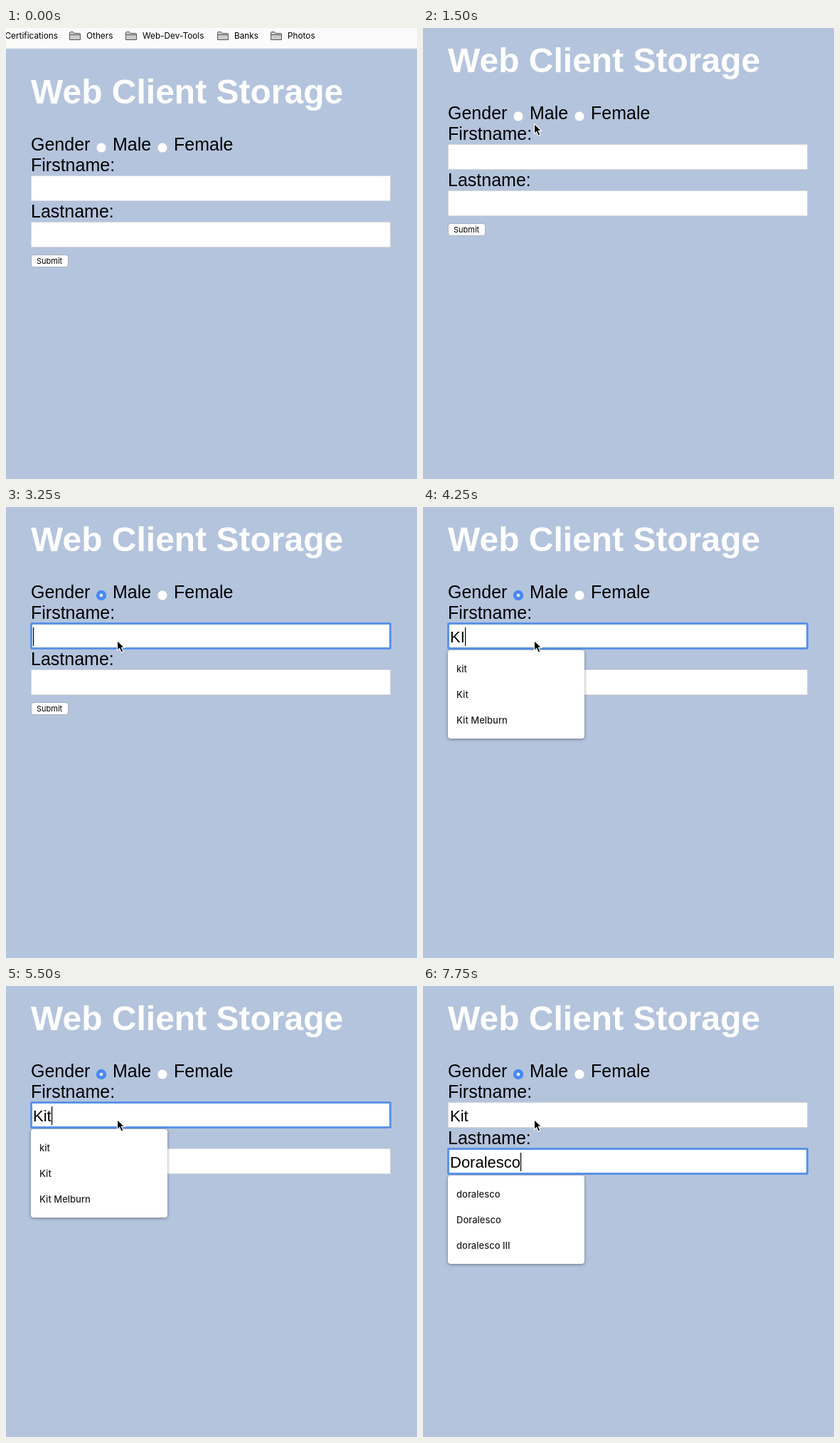
Write an HTML page that moves like this. It is 578x633 px and loops after 8 s.

```html
<!DOCTYPE html>
<html lang="en">
<head>
<meta charset="utf-8">
<title>Web Client Storage</title>
<style>
html, body { margin: 0; width: 100%; height: 100%; overflow: hidden; background: #b4c4dd; }
svg { display: block; width: 100%; height: 100%; }
text { font-kerning: none; white-space: pre; }
.title { font: bold 48px "Liberation Sans", sans-serif; fill: #fff; }
.label { font: 25px "Liberation Sans", sans-serif; }
.value { font: 22px "Liberation Sans", sans-serif; }
.bookmark { font: 11.8px Inter, sans-serif; }
.button { font: 11px Inter, sans-serif; }
.item { font: 500 13px Inter, sans-serif; fill: #222; }
.popup { fill: #fff; filter: drop-shadow(0 1px 2px rgba(0, 0, 0, .4)); }
.ring { fill: #fff; stroke: #5c93e8; stroke-width: 3; }
.box { fill: #fff; stroke: #d6d8dc; }
.radio { fill: #fff; stroke: #a9b3c4; stroke-width: .6; }
</style>
</head>
<body>
<svg id="stage" viewBox="0 0 578 633" preserveAspectRatio="none"></svg>
<script>
const stage = document.getElementById('stage');
const LOOP = 8000, STEP = 250;

// Each entry changes part of the state at its time.
const timeline = [
  [0, { bar: true, cursor: null, radio: 'off', focus: -1, values: ['', ''], items: 0, caret: true }],
  [250, { bar: false }],
  [500, { cursor: [444, 48] }],
  [750, { cursor: [372, 82] }],
  [1000, { cursor: [252, 120] }],
  [1250, { cursor: [174, 136] }],
  [1500, { cursor: [156, 134] }],
  [1750, { cursor: [142, 129] }],
  [2000, { cursor: [132, 124] }],
  [2250, { radio: 'pressed' }],
  [2500, { radio: 'on' }],
  [2750, { cursor: [143, 156] }],
  [3000, { cursor: [156, 187] }],
  [3250, { focus: 0 }],
  [3500, { values: ['K', ''], items: 6 }],
  [4000, { caret: false }],
  [4250, { values: ['KI', ''], items: 3, caret: true }],
  [4500, { values: ['K', ''], items: 6 }],
  [4750, { values: ['', ''] }],
  [5000, { values: ['K', ''] }],
  [5250, { values: ['Ki', ''], items: 4 }],
  [5500, { values: ['Kit', ''], items: 3 }],
  [5750, { focus: 1, items: 0 }],
  [6250, { values: ['Kit', 'Do'], items: 3 }],
  [6500, { values: ['Kit', 'Dora'] }],
  [6750, { values: ['Kit', 'Dorale'] }],
  [7000, { values: ['Kit', 'Doralesco'] }],
  [7500, { caret: false }],
  [7750, { caret: true }]
];

const suggestions = [
  ['kit', 'Kit', 'Kit Melburn', 'Kipp', 'Kasper', 'Kolbert'],
  ['doralesco', 'Doralesco', 'doralesco III']
];

const text = (cls, x, y, str) => `<text class="${cls}" x="${x}" y="${y}">${str}</text>`;
const rect = (cls, x, y, w, h, r = 0) =>
  `<rect class="${cls}" x="${x}" y="${y}" width="${w}" height="${h}" rx="${r}"/>`;

const ruler = document.createElement('canvas').getContext('2d');
ruler.font = '22px "Liberation Sans", sans-serif';
ruler.fontKerning = 'none';

function bookmarks() {
  const folders = [[89, 'Others'], [168, 'Web-Dev-Tools'], [297, 'Banks'], [372, 'Photos']];
  return '<rect width="578" height="29" fill="#fbfbfb"/><rect y="28.5" width="578" height="1" fill="#d5dae2"/>' +
    '<text class="bookmark" x="73" y="15" text-anchor="end">Certifications</text>' +
    folders.map(([x, name]) =>
      `<path d="M${x + .5} 16.5v-10q0-1 1-1h4l1.5 2h7.5q1 0 1 1v8zm0-7h15" fill="#cbcbcb" stroke="#555"/>` +
      text('bookmark', x + 24, 15, name)).join('');
}

function radio(x, mode) {
  const circle = `<circle class="radio" cx="${x}" cy="124" r="7"/>`;
  if (mode === 'off') return circle;
  const color = mode === 'on' ? '#4788f4' : '#2f6bd0';
  return `<circle cx="${x}" cy="124" r="7.2" fill="${color}"/><circle cx="${x}" cy="124" r="2.3" fill="#fff"/>`;
}

function field(index, s) {
  const top = 163 + index * 65, value = s.values[index], focused = s.focus === index;
  let out = focused ? rect('ring', 35.5, top + .5, 505, 35, 1) : rect('box', 35.5, top + .5, 505, 35);
  out += text('value', 38, top + 27, value);
  if (focused && s.caret) {
    out += rect('', Math.round(38 + ruler.measureText(value).width), top + 6, 1.2, 26);
  }
  return out;
}

function popup(s) {
  if (!s.items) return '';
  const top = 201 + s.focus * 65;
  return rect('popup', 35, top, 192, s.items * 36 + 16, 4) +
    suggestions[s.focus].slice(0, s.items)
      .map((name, i) => text('item', 47, top + 31 + i * 36, name)).join('');
}

function pointer([x, y]) {
  return `<path transform="translate(${x} ${y})" d="M.5 .5V14.3L3.7 11.4 6.2 17.2 8.9 16 6.4 10.4H10.7Z"
    stroke="#fff" stroke-width="1.1"/>`;
}

function draw(s) {
  stage.innerHTML = '<rect width="578" height="633" fill="#b4c4dd"/>' +
    `<g transform="translate(0 ${s.bar ? 44 : 0})">` +
    text('title', 35, 62, 'Web Client Storage') +
    text('label', 35, 128, 'Gender') + radio(134, s.radio) +
    text('label', 150, 128, 'Male') + radio(220, 'off') +
    text('label', 236, 128, 'Female') +
    text('label', 35, 157, 'Firstname:') + field(0, s) +
    text('label', 35, 222, 'Lastname:') + field(1, s) +
    '<rect x="35.5" y="274.5" width="52" height="17" rx="3.5" fill="#fff" stroke="#a8b0bf"/>' +
    text('button', 43, 287, 'Submit') + popup(s) + '</g>' +
    (s.bar ? bookmarks() : '') + (s.cursor ? pointer(s.cursor) : '');
}

let shown = -1;
function tick() {
  const time = Math.floor(performance.now() % LOOP / STEP) * STEP;
  if (time !== shown) {
    shown = time;
    draw(Object.assign({}, ...timeline.filter(([at]) => at <= time).map(([, change]) => change)));
  }
  requestAnimationFrame(tick);
}
tick();
</script>
</body>
</html>
```
